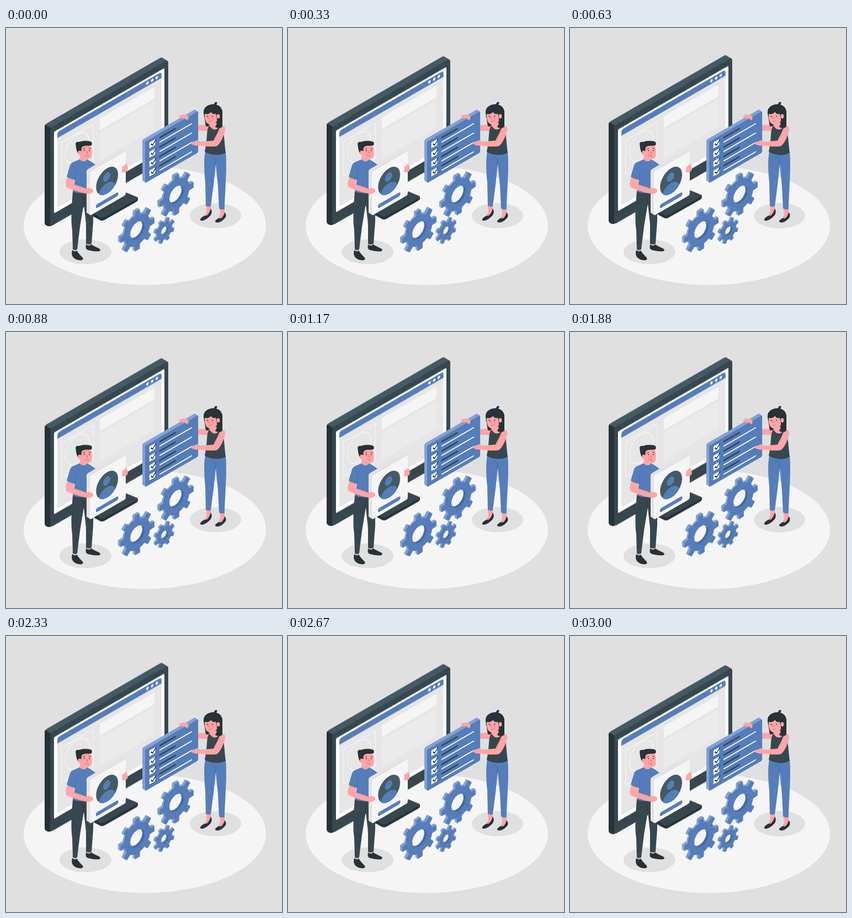
An HTML page that plays this animation: 500x500 px, repeating every 3040 ms.

```html
<!DOCTYPE html>
<html lang="en">
<head>
<meta charset="utf-8">
<title>Building a profile page</title>
<style>
  html, body { margin: 0; width: 100%; height: 100%; overflow: hidden; background: #e0e0e0; }
  svg { display: block; width: 100vw; height: 100vh; }
  .blue { fill: #557dba; }
  .dark { fill: #263238; }
  .slate { fill: #37474f; }
  .steel { fill: #455a64; }
  .skin { fill: #ffa4a5; }
  .shade { fill: #e0e0e0; }
  .line { fill: none; stroke: #263238; stroke-linecap: round; stroke-linejoin: round; }
  #monitor { animation: hover 1520ms linear infinite alternate; }
  .turn { animation: turn 380ms ease-in-out infinite alternate; }
  .back { animation-name: turn-back; }
  @keyframes hover { to { transform: translateY(-10px); } }
  @keyframes turn { to { transform: rotate(-3deg); } }
  @keyframes turn-back { to { transform: rotate(3deg); } }
</style>
</head>
<body>
<svg viewBox="0 0 500 500">
  <defs><clipPath id="disc"><circle cx="36" cy="34" r="23"/></clipPath></defs>

  <ellipse cx="251.5" cy="358" rx="219.5" ry="107.5" fill="#f5f5f5"/>
  <ellipse class="shade" cx="144" cy="405.5" rx="47" ry="22.5"/>
  <ellipse class="shade" cx="379.5" cy="340" rx="46.5" ry="23"/>

  <g id="monitor">
    <path class="dark" d="M150 336L239 307V311Q239 313 236 315L178 348Q174 350 170 348L150 337Z"/>
    <path class="slate" d="M150 330L213 299Q216 297 220 299L237 306Q241 308 237 310L178 343Q174 345 170 343Z"/>
    <g id="shell"></g>
    <path class="dark" d="M70 179Q70 177 71 175L81 181V359L76 359Q70 357 70 353Z"/>
    <g transform="matrix(.866 -.5 0 1 80 183)">
      <rect class="slate" y="-2" width="247" height="179" rx="5"/>
      <rect x="8" y="9" width="231" height="148" rx="2" fill="#fff"/>
      <rect x="15" y="23" width="218" height="127" fill="#e6e6e6"/>
      <path class="blue" d="M15 24V18Q15 13 20 13H228Q233 13 233 18V24Z"/>
      <g fill="#fff"><circle cx="203.5" cy="18.5" r="2.6"/><circle cx="213.5" cy="18.5" r="2.6"/><circle cx="223" cy="18.5" r="2.6"/></g>
      <g fill="#e6e6e6" stroke="#f5f5f5" stroke-width="1.5">
        <rect x="24" y="36" width="66" height="63"/>
        <circle cx="56.6" cy="63" r="25"/>
      </g>
      <rect x="104" y="33" width="114" height="21" fill="#f5f5f5"/>
      <rect x="104" y="59" width="114" height="50" fill="#ebebeb"/>
    </g>
  </g>

  <g id="woman-back">
    <path class="skin" d="M368 175L347 176V186L368 187Z"/>
    <path class="dark" d="M358 154C357 143 367 138 377 138C378 134 380 133 383 135L381 139C389 141 393 148 392 156V176C390 182 380 183 375 179L362 178Z"/>
  </g>

  <g id="board"></g>
  <g transform="matrix(.866 -.5 0 1 252 206)">
    <rect class="blue" width="111" height="75" rx="2.5"/>
    <g id="rows"></g>
  </g>

  <g id="woman">
    <path class="skin" d="M313 160C317 156 323 157 328 158C332 160 331 166 328 167L324 164L315 163Z"/>
    <path class="skin" d="M362 321H371L371 331L366 341L356 345L363 333ZM387 327H396L396 338L390 347L383 349L388 338Z"/>
    <path class="dark" d="M371 327C374 332 373 338 368 342C362 348 354 351 352 348C351 345 357 341 360 340C364 342 369 335 371 327Z"/>
    <path class="dark" d="M396 334C400 338 399 343 395 346C390 352 382 354 379 351C378 348 383 346 386 344C390 347 394 342 396 334Z"/>
    <path class="blue" d="M361 223C358 240 359 262 361 279L362 322Q367 325 371 323L376 284L380 246L384 286L386 327Q391 330 396 328C396 305 401 255 398 224Z"/>
    <path d="M379 250L380 237L372 232" fill="none" stroke="#3f65a6" stroke-width=".8"/>
    <path class="skin" d="M367 177L373 172H384L391 178L386 190L370 189Z"/>
    <path class="slate" d="M369 177C362 182 366 199 360 224C370 231 388 232 398 226C396 212 396 198 392 179L386 178C384 185 374 187 369 177Z"/>
    <path class="skin" d="M391 177C397 177 399 182 396 189C393 199 388 210 382 214C372 216 360 214 350 213L342 213L335 210C332 208 335 206 340 206L346 203L351 206L376 204C379 197 384 190 386 183Z"/>
    <path class="skin" d="M360 150H383L383 166C382 171 377 175 370 175C363 174 360 168 360 160Z"/>
    <path class="dark" d="M358 155C359 142 369 138 378 139C389 140 393 148 392 158V179C388 182 382 182 379 179C382 175 383 170 382 165L380 155C377 157 374 156 371 152C369 156 363 157 358 155Z"/>
    <ellipse class="skin" cx="384.5" cy="160" rx="3" ry="4"/>
    <g class="dark"><circle cx="364.5" cy="160" r="1"/><circle cx="374" cy="160" r="1"/></g>
    <path d="M367 160L366 164H368M367 169Q370 170 373 168" fill="none" stroke="#d65f6c" stroke-width=".9"/>
  </g>

  <g id="gears"></g>

  <g id="man">
    <path class="skin" d="M121 399H128V406H121ZM146 389H155V395H146Z"/>
    <path class="dark" d="M120 402C118 410 119 416 129 420C137 422 141 420 139 416C134 412 131 407 128 403C126 406 122 405 120 402Z"/>
    <path class="dark" d="M145 392C144 398 144 402 152 403C160 405 171 406 171 402C170 398 160 397 155 392C152 395 148 395 145 392Z"/>
    <path class="slate" d="M121 296C119 320 117 347 120 366L121 401Q125 403 129 401L134 360L141 318L145 355V391Q150 393 155 391L158 350V297Z"/>
    <path d="M141 318L140 306" fill="none" stroke="#263238" stroke-width=".8"/>
    <path class="skin" d="M134 224H147V241L140 245L133 240Z"/>
    <path class="blue" d="M133 238C126 242 118 242 116 249L110 269C114 273 120 275 125 275L121 296C128 300 140 300 149 298L150 258L164 250C158 243 150 240 147 238C144 242 138 243 133 238Z"/>
    <path d="M125 275L127 259" fill="none" stroke="#3f65a6" stroke-width=".8"/>
    <path class="skin" d="M134 213H153C156 217 157 230 154 235C151 239 143 238 139 235L134 226Z"/>
    <path class="dark" d="M126 209C128 205 132 207 134 206C140 204 152 204 155 207C157 210 155 213 153 213C148 214 142 212 137 216L136 226L132 229C127 224 127 215 126 209Z"/>
    <ellipse class="skin" cx="133.5" cy="226" rx="3.3" ry="4"/>
    <g class="dark"><circle cx="142" cy="222" r="1"/><circle cx="151" cy="222" r="1"/></g>
    <path class="line" d="M140 219L143 218M150 218L153 219" stroke-width=".9"/>
    <path d="M147 223L148 227H146M143 231Q147 234 150 231" fill="none" stroke="#d65f6c" stroke-width=".9"/>

    <g id="card"></g>
    <g transform="matrix(.866 -.5 0 1 152 261)">
      <rect width="75" height="79" rx="3" fill="#f5f5f5"/>
      <circle class="steel" cx="36" cy="34" r="23"/>
      <g class="blue">
        <circle cx="35" cy="26.5" r="7.5"/>
        <path clip-path="url(#disc)" d="M18 60V53C19 33 53 33 53 53V60Z"/>
        <rect x="12.5" y="65.5" width="47" height="7" rx="3"/>
      </g>
    </g>
    <path class="skin" d="M111 271C107 283 107 288 113 290C125 295 138 299 146 300C153 301 158 299 158 295C158 290 151 289 146 291L122 283L124 275Z"/>
    <path class="skin" d="M211 251C215 250 216 245 219 247C220 251 222 255 220 258C218 262 213 262 210 261Z"/>
  </g>
</svg>
<script>
  const byId = id => document.getElementById(id);
  const iso = (x, y, inner) => `<g transform="matrix(.866 -.5 0 1 ${x} ${y})">${inner}</g>`;

  // Stacks copies of a flat shape to give it depth towards the upper left.
  function extrude(x, y, dx, dy, inner) {
    const steps = Math.ceil(Math.abs(dx) * 2);
    let out = '';
    for (let i = steps; i > 0; i--) out += iso(x + dx * i / steps, y + dy * i / steps, inner);
    return out;
  }

  const slab = (w, h, r, fill) => `<rect width="${w}" height="${h}" rx="${r}" fill="${fill}"/>`;
  byId('shell').innerHTML = extrude(80, 181, -10, -6, slab(247, 179, 5, '#455a64'));
  byId('board').innerHTML = extrude(252, 206, -5, -3.5, slab(111, 75, 2.5, '#85a1d2'));
  byId('card').innerHTML = extrude(152, 261, -6, -4, slab(75, 79, 3, '#e3e3e3'));

  byId('rows').innerHTML = [0, 1, 2, 3].map(i => `<g transform="translate(0 ${i * 17})">
    <rect x="9" y="6" width="12" height="10.5" fill="#fff"/>
    <path class="line" d="M12.5 10.5L16 14L22.5 7" stroke-width="1.8"/>
    <path class="line" d="M31 8H63" stroke-width="3.2" style="stroke:#37474f"/>
    <path class="line" d="M31 16H97" stroke-width="2.2" style="stroke:#fff"/></g>`).join('');

  const circlePath = r => `M${r} 0A${r} ${r} 0 1 0 ${-r} 0A${r} ${r} 0 1 0 ${r} 0Z`;

  function gearPath(root, tip, hole, phase) {
    const at = (r, deg) => {
      const a = (deg + phase) * Math.PI / 180;
      return `${(r * Math.cos(a)).toFixed(2)} ${(r * Math.sin(a)).toFixed(2)}`;
    };
    let d = '';
    for (let a = 0; a < 360; a += 45) {
      d += `${a ? 'L' : 'M'}${at(root, a - 11.5)}L${at(tip, a - 8)}L${at(tip, a + 8)}L${at(root, a + 11.5)}`;
      d += `A${root} ${root} 0 0 1 ${at(root, a + 33.5)}`;
    }
    return `${d}Z${circlePath(hole)}`;
  }

  function gear(x, y, root, tip, hole, depth, phase, turn) {
    const shape = (d, fill) => `<path class="${turn}" d="${d}" fill="${fill}" fill-rule="evenodd"/>`;
    const body = gearPath(root, tip, hole, phase);
    const rim = circlePath(root - 4) + circlePath(hole);
    return extrude(x, y, -depth, -depth * .6, shape(body, '#83a0d1')) +
      extrude(x, y, -depth, -depth * .6, shape(rim, '#456ba6')) +
      iso(x, y, shape(body, '#557dba'));
  }

  byId('gears').innerHTML =
    gear(309, 302, 27, 36, 15, 4, 0, 'turn') +
    gear(238, 366.5, 27, 36, 15, 4, 0, 'turn') +
    gear(287.5, 367.5, 15.5, 21, 7.5, 3, 22.5, 'turn back');
</script>
</body>
</html>
```
